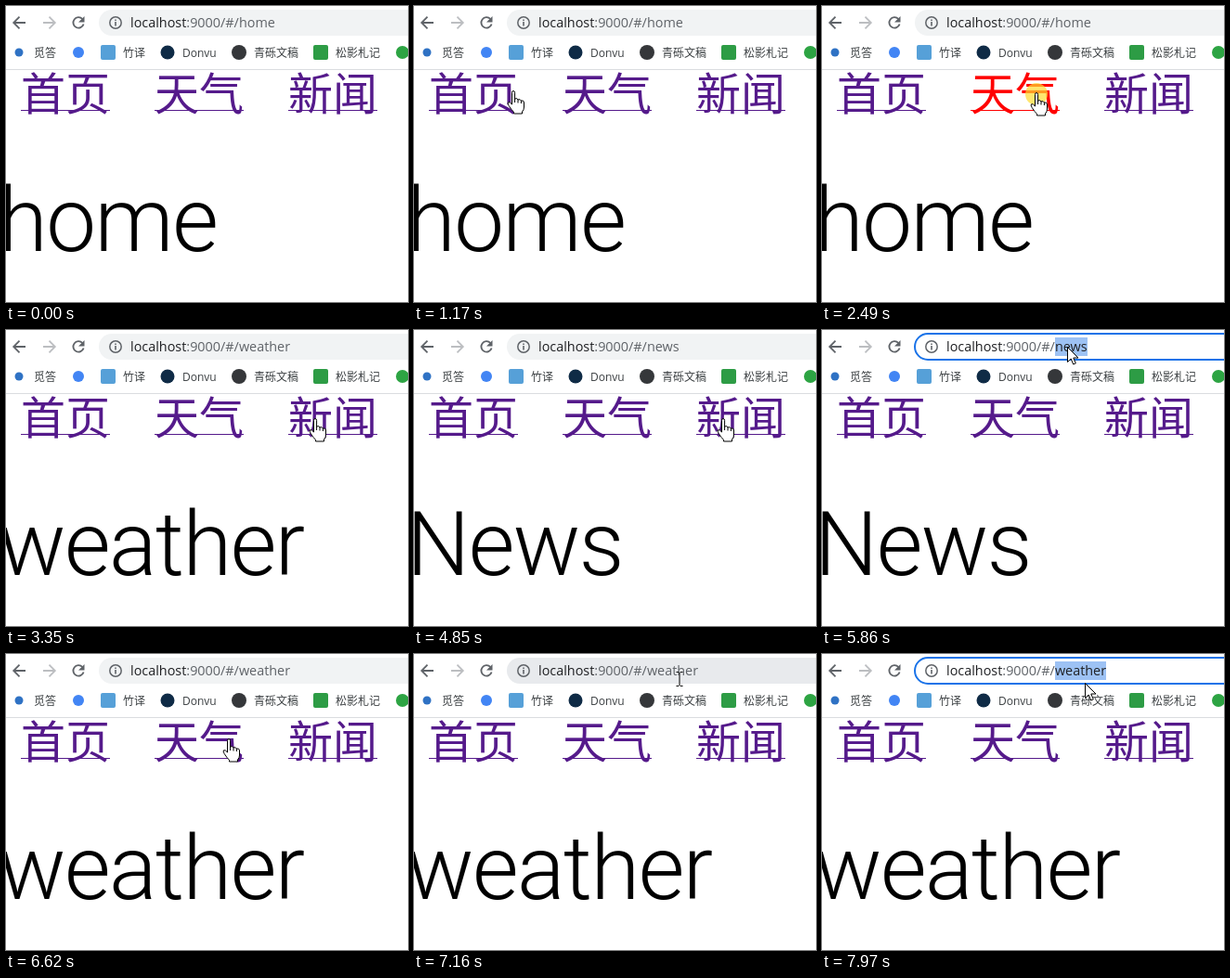
Animation of 433 by 319 pixels, one loop 8000 ms. Source, as an HTML page:

```html
<!DOCTYPE html>
<html lang="zh-CN">
<head>
<meta charset="utf-8">
<title>Hash router</title>
<style>
html, body { margin: 0; width: 100%; height: 100%; overflow: hidden; background: #fff; }
svg { display: block; width: 433px; height: 319px; }
text { white-space: pre; }
.url { font: 14.4px "Open Sans", sans-serif; fill: #5f6368; }
.mark { font: 12px "Open Sans", "Noto Sans CJK SC", "Noto Sans CJK", sans-serif; fill: #3c4043; }
.nav { fill: #551a8b; }
.nav .active { fill: #f00; }
.nav text { font: 350 48px "Noto Sans CJK SC", "Noto Sans CJK", sans-serif; }
.page { font: 300 96px Roboto, sans-serif; letter-spacing: -1.5px; }
.line { fill: none; stroke: #5f6368; stroke-width: 1.8; }
.pointer path { fill: #fff; stroke: #000; stroke-linejoin: round; }
.focused { fill: #fff; stroke: #1a73e8; stroke-width: 2; }
.hovered { fill: #e8eaed; }
.idle { fill: #f1f3f4; }
</style>
</head>
<body>
<svg viewBox="0 0 433 319">
  <path class="line" d="M21 18H8.5M14.5 11.7L8.2 18L14.5 24.3"/>
  <path class="line" style="stroke:#bcbec1" d="M40 18H52.5M46.5 11.7L52.8 18L46.5 24.3"/>
  <path class="line" d="M82.3 14A5.7 5.7 0 1 0 83.6 19.5"/>
  <path fill="#5f6368" d="M84.5 11V17.5H78Z"/>
  <rect id="box" x="100" y="4" width="400" height="28" rx="14"/>
  <circle class="line" cx="118" cy="18" r="6.2" style="stroke-width:1.5"/>
  <path fill="#5f6368" d="M117.2 17h1.6v4.4h-1.6zM117.2 14.4h1.6v1.6h-1.6z"/>
  <rect id="selection" y="8" height="20" fill="#9dc2f4"/>
  <text class="url" x="134" y="23"><tspan fill="#202124">localhost</tspan>:9000/#/<tspan id="route"></tspan></text>
  <g id="marks"></g>
  <rect y="68" width="433" height="1" fill="#dadce0"/>
  <g id="nav" class="nav"></g>
  <text id="page" class="page" x="-8" y="264"></text>
  <circle id="press" r="12" fill="#ffdc30" opacity=".7"/>
  <g id="pointer" class="pointer">
    <path id="arrow" d="M.5 .5V16.5L4.2 13L6.7 19L9.3 17.9L6.8 12H12Z"/>
    <g id="hand">
      <path d="M-1.5 13V1.5Q-1.5 -.5 0 -.5T1.6 1.5V8Q4.4 6.8 5 9Q7.6 7.9 8.4 10Q11.5 9.4 11.5 12V17Q11.5 20 9.5 22V24H.5V22.3Q-2 20 -4.8 15.5Q-6.6 12.6 -5.5 11.8Q-4 10.8 -1.5 14Z"/>
      <path d="M1.6 8V12M5 9V12.5M8.4 10V13"/>
    </g>
    <path id="beam" style="fill:none" d="M-3.5 -7.5H-1L0 -6.5L1 -7.5H3.5M0 -6.5V6.5M-3.5 7.5H-1L0 6.5L1 7.5H3.5"/>
  </g>
</svg>
<script>
const LOOP = 8000, POINTER_IN = 800;
const LINK_WIDTH = 96, LINK_PITCH = 144;
const $ = id => document.getElementById(id);

const bookmarks = [
  { label: "觅答", color: "#2f72c4", r: 4.5 },
  { label: "", color: "#4285f4", r: 6 },
  { label: "竹译", color: "#56a0d8", r: 8, square: true },
  { label: "Donvu", color: "#0f2b46", r: 7.5 },
  { label: "青砾文稿", color: "#35373a", r: 8 },
  { label: "松影札记", color: "#2d9c45", r: 8, square: true },
  { label: "", color: "#2da443", r: 7 }
];

const pages = [
  { link: "首页", route: "home", heading: "home" },
  { link: "天气", route: "weather", heading: "weather" },
  { link: "新闻", route: "news", heading: "News" }
].map((page, i) => ({ ...page, x: 16 + i * LINK_PITCH }));
const [home, weather, news] = pages;

const clicks = [
  { page: home, down: 1420, up: 1540 },
  { page: weather, down: 2490, up: 2630 },
  { page: news, down: 4110, up: 4270 }
];
const edits = [
  { focus: 5480, enter: 6620, page: weather },
  { focus: 7590, enter: LOOP, page: weather }
];
const visits = [
  { at: 0, page: home },
  ...clicks.map(c => ({ at: c.up, page: c.page })),
  ...edits.map(e => ({ at: e.enter, page: e.page }))
];

const entry = [399, 114];
const moves = [
  { at: POINTER_IN, ms: 480, to: [91, 91] },
  { at: 1790, ms: 370, to: [231, 94] },
  { at: 2960, ms: 390, to: [333, 96] },
  { at: 4850, ms: 740, to: [264, 18] },
  { at: 5960, ms: 500, to: [240, 92] },
  { at: 6660, ms: 460, to: [286, 27] },
  { at: 7430, ms: 530, to: [283, 31] }
];

function drawBookmarks() {
  let cx = 14;
  $("marks").innerHTML = bookmarks.map(({ label, color, r, square }) => {
    const icon = `<rect x="${cx - r}" y="${50 - r}" width="${2 * r}" height="${2 * r}" rx="${square ? 2 : r}" fill="${color}"/>`;
    const text = `<text class="mark" x="${cx + 16}" y="55">${label}</text>`;
    const textWidth = label.length * (/[a-z]/.test(label) ? 7.4 : 12);
    cx += label ? textWidth + 40 : 32;
    return icon + text;
  }).join("");
}

function drawLinks() {
  $("nav").innerHTML = pages.map(({ link, x }) =>
    `<g><text x="${x}" y="112">${link}</text><rect x="${x}" y="112" width="${LINK_WIDTH}" height="1"/></g>`).join("");
}

const show = (id, on) => $(id).style.display = on ? "" : "none";
const setAll = (id, attrs) => { for (const k in attrs) $(id).setAttribute(k, attrs[k]); };
const easeOut = k => 1 - (1 - k) ** 2;

function pointerAt(t) {
  return moves.filter(m => m.at <= t).reduce((from, { at, ms, to }) => {
    const e = easeOut(Math.min(1, (t - at) / ms));
    return from.map((v, i) => Math.round(v + (to[i] - v) * e));
  }, entry);
}

// A first click takes the whole address, a double click then takes the route.
function selectionAt(t, edit, page) {
  if (!edit) return null;
  const age = t - edit.focus;
  if (age >= 200 && age < 280) return null;
  return { left: age < 200 ? 134 : 251, right: page === news ? 286 : 306 };
}

function render(t) {
  const [x, y] = pointerAt(t);
  const { page } = visits.filter(v => v.at <= t).pop();
  const click = clicks.find(c => t >= c.down && t < c.up);
  const edit = edits.find(e => t >= e.focus && t < e.enter);
  const selection = selectionAt(t, edit, page);
  const visible = t >= POINTER_IN;
  const inBox = visible && y < 34;

  $("route").textContent = page.route;
  $("route").setAttribute("fill", selection ? "#202124" : "#5f6368");
  $("page").textContent = page.heading;
  $("box").setAttribute("class", edit ? "focused" : inBox ? "hovered" : "idle");

  show("selection", selection);
  if (selection) setAll("selection", { x: selection.left, width: selection.right - selection.left });

  pages.forEach((p, i) => $("nav").children[i].classList.toggle("active", click?.page === p));

  const overLink = y > 69 && y < 118 && pages.some(p => x >= p.x && x < p.x + LINK_WIDTH);
  const overSelection = selection && x >= selection.left && x < selection.right;
  const kind = overLink ? "hand" : inBox && !overSelection ? "beam" : "arrow";
  for (const id of ["arrow", "hand", "beam"]) show(id, id === kind);
  show("pointer", visible);
  $("pointer").setAttribute("transform", `translate(${x} ${y})`);
  show("press", click);
  setAll("press", { cx: x, cy: y + 1 });
}

drawBookmarks();
drawLinks();
const start = performance.now();
(function tick() {
  render((performance.now() - start) % LOOP);
  requestAnimationFrame(tick);
})();
</script>
</body>
</html>
```
